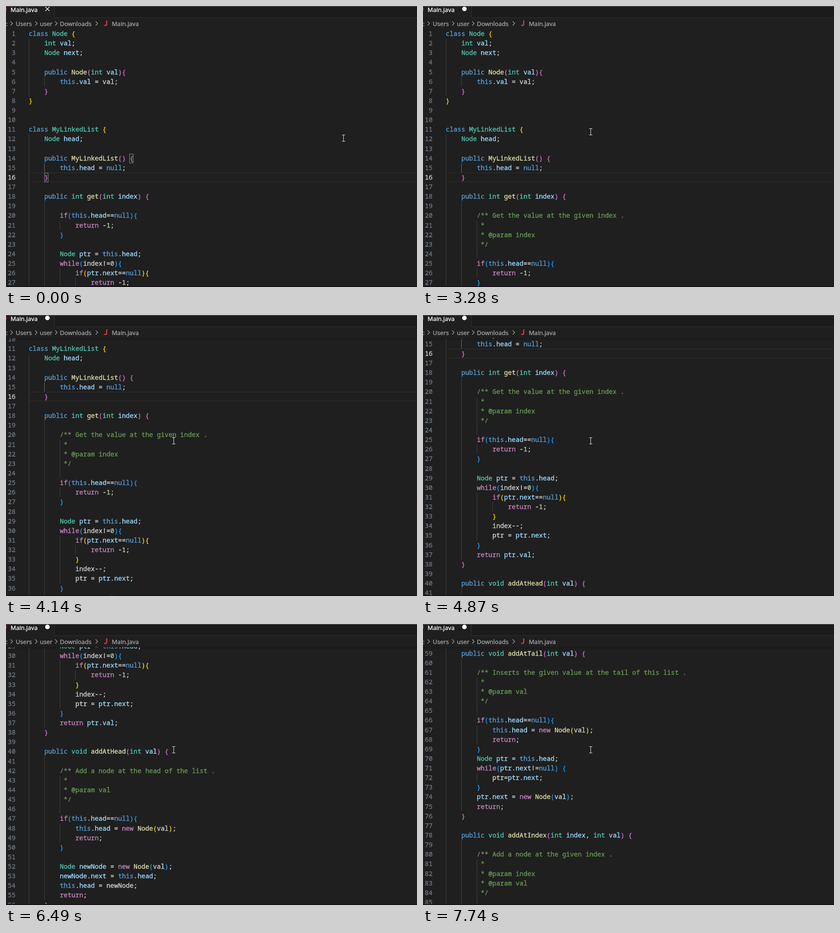
Write an HTML page with a canvas that moves like this. It is 903 px wide and 620 px high and loops after 8000 ms.

```html
<!DOCTYPE html>
<html lang="en">
<head>
<meta charset="utf-8">
<title>Code editor</title>
<style>
html, body { margin: 0; width: 100%; height: 100%; overflow: hidden; background: #1f1f1f; }
canvas { display: block; }
</style>
</head>
<body>
<canvas id="stage" width="903" height="620"></canvas>
<script>
const ctx = document.getElementById('stage').getContext('2d');
const W = 903, H = 620, LOOP = 8000;
const LEFT = 50, TOP = 51, CHAR = 8.532, ROW = 21.13;
const CODE_FONT = '14.22px "Noto Sans Mono", monospace';
const UI_FONT = '13.3px "Open Sans", sans-serif';
const PALETTE_OPEN = 140, PALETTE_CLOSE = 1480, INSERTED = 2700;
const BRACKETS = ['#ffd700', '#da70d6', '#179fff'];
const COLOR = {
  plain: '#d4d4d4', keyword: '#569cd6', control: '#c586c0', type: '#4ec9b0',
  call: '#dcdcaa', name: '#9cdcfe', number: '#b5cea8', comment: '#6a9955'
};

const source = `class Node {
    int val;
    Node next;

    public Node(int val){
        this.val = val;
    }
}


class MyLinkedList {
    Node head;

    public MyLinkedList() {
        this.head = null;
    }

    public int get(int index) {

        /** Get the value at the given index .
         *
         * @param index
         */

        if(this.head==null){
            return -1;
        }

        Node ptr = this.head;
        while(index!=0){
            if(ptr.next==null){
                return -1;
            }
            index--;
            ptr = ptr.next;
        }
        return ptr.val;
    }

    public void addAtHead(int val) {

        /** Add a node at the head of the list .
         *
         * @param val
         */

        if(this.head==null){
            this.head = new Node(val);
            return;
        }

        Node newNode = new Node(val);
        newNode.next = this.head;
        this.head = newNode;
        return;
    }


    public void addAtTail(int val) {

        /** Inserts the given value at the tail of this list .
         *
         * @param val
         */

        if(this.head==null){
            this.head = new Node(val);
            return;
        }
        Node ptr = this.head;
        while(ptr.next!=null) {
            ptr=ptr.next;
        }
        ptr.next = new Node(val);
        return;
    }

    public void addAtIndex(int index, int val) {

        /** Add a node at the given index .
         *
         * @param index
         * @param val
         */

        return;`.split('\n');

function wordColor(word, before, after) {
  if (/^(class|public|this|null)$/.test(word)) return COLOR.keyword;
  if (/^(if|while|return|new)$/.test(word)) return COLOR.control;
  if (/^(int|void)$/.test(word)) return COLOR.type;
  if (after[0] === '(') return COLOR.call;
  if (/^(Node|MyLinkedList)$/.test(word)) return COLOR.type;
  if (/^\d/.test(word)) return COLOR.number;
  const named = after[0] === '.' || /(\.|\bint |\bNode )$/.test(before);
  return named ? COLOR.name : COLOR.plain;
}

const indentOf = line => line.search(/\S/);

// Blank lines take their guides from the nearest text above and below.
function guideCount(lines, i) {
  if (lines[i]) return Math.ceil(indentOf(lines[i]) / 4);
  const above = indentOf(lines.slice(0, i).reverse().find(Boolean));
  const below = indentOf(lines.slice(i).find(Boolean));
  return above === below ? Math.ceil(below / 4) : 1 + Math.floor(Math.min(above, below) / 4);
}

function parse(lines) {
  let depth = 0;
  return lines.map((line, i) => {
    const tokens = [];
    const guides = guideCount(lines, i);
    if (/^\s*\/?\*/.test(line)) {
      tokens.push({ text: line.trim(), col: indentOf(line), color: COLOR.comment });
      return { tokens, guides };
    }
    for (const match of line.matchAll(/\w+|[(){}]|[^\s\w(){}]+/g)) {
      const text = match[0], col = match.index;
      let color = COLOR.plain;
      if ('({'.includes(text)) color = BRACKETS[depth++ % 3];
      else if (')}'.includes(text)) color = BRACKETS[--depth % 3];
      else if (/\w/.test(text)) color = wordColor(text, line.slice(0, col), line.slice(col + text.length));
      tokens.push({ text, col, color });
    }
    return { tokens, guides };
  });
}

const rowsAfter = parse(source);
const rowsBefore = parse(source.filter((_, i) => i < 19 || i > 23));

// Keys are [time, ...values]; each stretch eases in and out.
const scrollKeys = [[3590, 0], [4140, 198], [4680, 198], [5110, 426], [5600, 426],
  [6050, 603.6], [6550, 603.6], [6880, 908], [7320, 908], [7740, 1222]];
const mouseKeys = [[650, 741, 292], [1320, 331, 48], [2190, 331, 48], [2260, 332, 50],
  [3000, 332, 50], [3280, 368, 278]];

function valuesAt(keys, t) {
  const next = keys.findIndex(key => key[0] > t);
  if (next === 0) return keys[0].slice(1);
  if (next < 0) return keys[keys.length - 1].slice(1);
  const a = keys[next - 1], b = keys[next];
  const u = (t - a[0]) / (b[0] - a[0]);
  const ease = u * u * (3 - 2 * u);
  return a.slice(1).map((v, i) => v + (b[i + 1] - v) * ease);
}

function rect(x, y, w, h, color) {
  ctx.fillStyle = color;
  ctx.fillRect(x, y, w, h);
}

// A hairline stroke gives the letters a slightly heavier weight.
function text(string, x, y, color) {
  ctx.fillStyle = ctx.strokeStyle = color;
  ctx.lineWidth = .35;
  ctx.fillText(string, x, y);
  ctx.strokeText(string, x, y);
}

function path(points, color, width, fill) {
  ctx.beginPath();
  points.forEach(([x, y]) => ctx.lineTo(x, y));
  if (fill) {
    ctx.closePath();
    ctx.fillStyle = fill;
    ctx.fill();
  }
  ctx.strokeStyle = color;
  ctx.lineWidth = width;
  ctx.stroke();
}

function bracketBox(col, y) {
  const x = Math.floor(LEFT + col * CHAR);
  rect(x, y, 9, 20, 'rgba(0,100,0,.1)');
  ctx.strokeStyle = '#888888';
  ctx.lineWidth = 1;
  ctx.strokeRect(x + .5, y + .5, 8, 20);
}

function drawCode(t, scroll) {
  const rows = t < INSERTED ? rowsBefore : rowsAfter;
  ctx.save();
  ctx.beginPath();
  ctx.rect(0, TOP, W, H - TOP);
  ctx.clip();
  ctx.font = CODE_FONT;
  rows.forEach((row, i) => {
    const y = Math.round(TOP + i * ROW - scroll);
    if (y < TOP - ROW || y > H) return;
    const current = i === 15;
    if (current) {
      rect(LEFT, y - 1, W, 2, '#282828');
      rect(LEFT, y + 19, W, 2, '#282828');
    }
    const height = Math.round(TOP + (i + 1) * ROW - scroll) - y;
    for (let g = 0; g < row.guides; g++) {
      const active = i === 14 && g === 1;
      rect(Math.floor(LEFT + g * 4 * CHAR), y, 1, height, active ? '#707070' : '#404040');
    }
    if (t < PALETTE_OPEN && i === 13) bracketBox(26, y);
    if (t < PALETTE_OPEN && current) bracketBox(4, y);
    ctx.textAlign = 'right';
    text(i + 1, 21, y + 15, current ? '#cccccc' : '#6e7681');
    ctx.textAlign = 'left';
    row.tokens.forEach(k => text(k.text, LEFT + k.col * CHAR, y + 15, k.color));
  });
  if (scroll > 0) {
    const shadow = ctx.createLinearGradient(0, TOP, 0, TOP + 5);
    shadow.addColorStop(0, 'rgba(0,0,0,.2)');
    shadow.addColorStop(1, 'rgba(0,0,0,0)');
    rect(0, TOP, W, 5, shadow);
  }
  ctx.restore();
}

function drawHeader(t) {
  rect(107, 1, W, 24, '#1b1b1b');
  rect(106, 1, 1, 25, '#2f2f2f');
  rect(107, 25, W, 1, '#2f2f2f');
  rect(0, 0, W, 1, '#666666');
  rect(0, 3, 1, 7, '#cc3e44');
  ctx.font = UI_FONT;
  text('Main.java', 10, 13, '#ffffff');
  if (t < INSERTED) {
    path([[86.5, 2], [95.5, 11]], '#f0f0f0', 1.4);
    path([[95.5, 2], [86.5, 11]], '#f0f0f0', 1.4);
  } else {
    ctx.beginPath();
    ctx.arc(91, 6.5, 5, 0, 7);
    ctx.fillStyle = '#ffffff';
    ctx.fill();
  }
  const crumbs = [[':', 0], ['Users', 21.5], ['user', 74.5], ['Downloads', 118.5], ['Main.java', 232.5]];
  crumbs.forEach(([label, x]) => text(label, x, 43.5, '#a9a9a9'));
  [10, 64, 108, 197].forEach(x => path([[x, 34], [x + 4.5, 38.5], [x, 43]], '#a9a9a9', 1.2));
  ctx.font = 'bold 16px "Noto Sans Mono", monospace';
  text('J', 214.5, 43.5, '#cc3e44');
}

function drawPalette(mouseY) {
  ctx.save();
  ctx.shadowColor = 'rgba(0,0,0,.5)';
  ctx.shadowBlur = 8;
  rect(152, 0, 666, 384, '#222222');
  ctx.restore();
  rect(159, 2, 652, 26, '#313131');
  const rowHeight = 24.4, first = 34;
  const hovered = Math.max(0, Math.floor((mouseY - first) / rowHeight));
  rect(159, first, 652, rowHeight, '#04395e');
  if (hovered > 0) rect(159, first + hovered * rowHeight, 652, rowHeight, '#2a2d2e');
}

function drawMouse(x, y, beam) {
  ctx.save();
  ctx.translate(Math.round(x), Math.round(y));
  if (beam) {
    rect(0, -8, 1, 15, '#e8e8e8');
    rect(-3, -8, 7, 1, '#e8e8e8');
    rect(-3, 6, 7, 1, '#e8e8e8');
  } else {
    path([[0, 0], [0, 13], [3, 10.3], [5.2, 15.5], [7.4, 14.5], [5.2, 9.6], [9.5, 9.6]],
      '#111111', .8, '#ffffff');
  }
  ctx.restore();
}

function draw(now) {
  const t = now % LOOP;
  const [scroll] = valuesAt(scrollKeys, t);
  const [x, y] = valuesAt(mouseKeys, t);
  const palette = t >= PALETTE_OPEN && t < PALETTE_CLOSE;
  rect(0, 0, W, H, '#1f1f1f');
  drawCode(t, scroll);
  drawHeader(t);
  if (palette) drawPalette(y);
  rect(0, 618, W, 2, '#17131a');
  drawMouse(x, y, !palette && y > TOP);
}

const start = performance.now();
function tick() {
  draw(performance.now() - start);
  requestAnimationFrame(tick);
}
tick();
</script>
</body>
</html>
```
